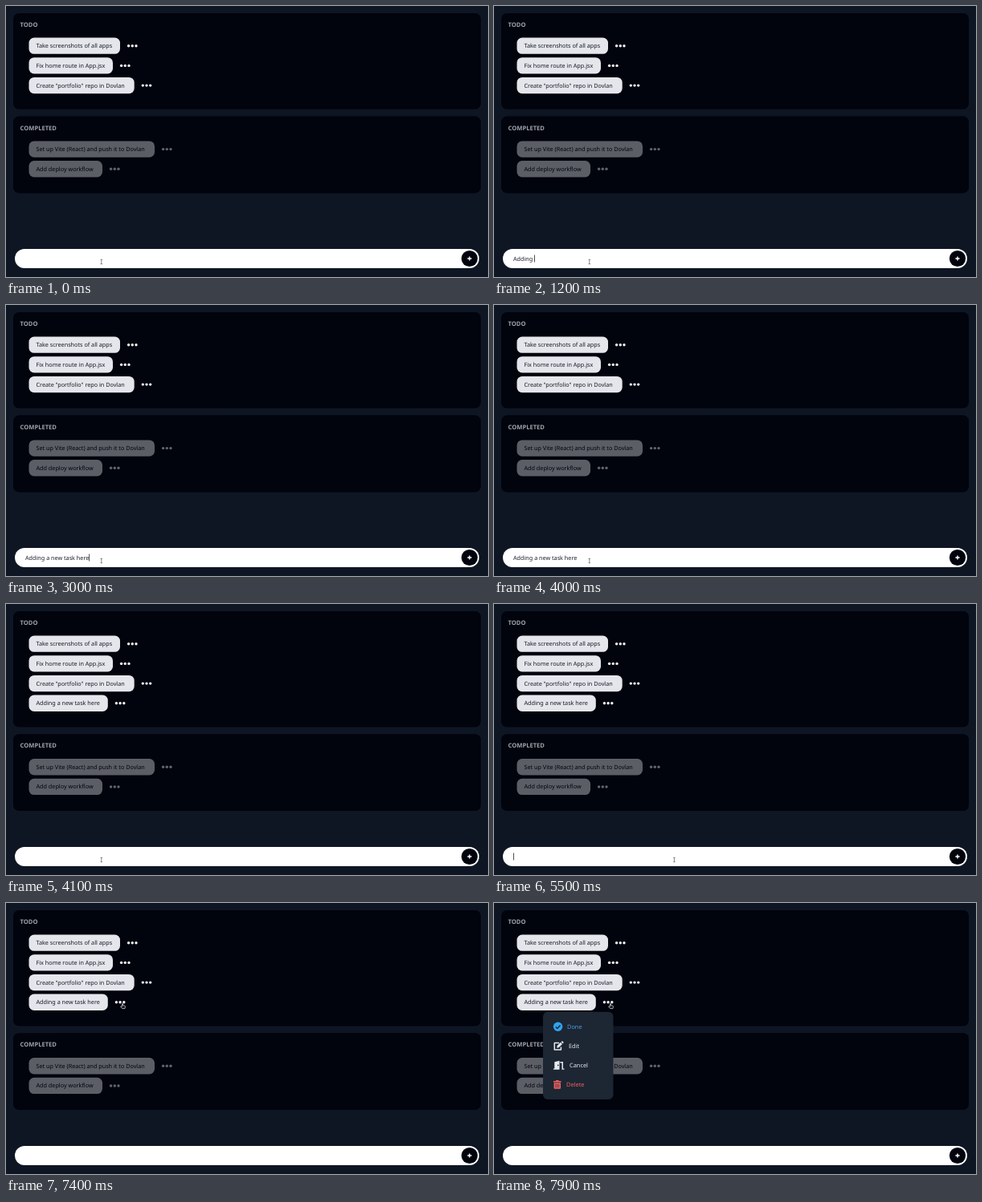
Animation, 600 px wide and 338 px high, one loop 8 s. Source, as an HTML page:

```html
<!DOCTYPE html>
<html lang="en">
<head>
<meta charset="utf-8">
<title>Todo list</title>
<style>
  html, body { margin: 0; width: 100%; height: 100%; overflow: hidden; background: #0f1623; }
  svg { display: block; width: 600px; height: 338px; }
  text { font: 7.23px "Noto Sans", "Open Sans", sans-serif; white-space: pre; text-rendering: geometricPrecision; }
  .panel { fill: #01030d; }
  .title { font-size: 7.6px; font-weight: 700; fill: #a0a4ac; }
  .pill { fill: #e5e6eb; }
  .label { fill: #161a25; }
  .dots { fill: #f4f5f7; }
  .done { opacity: .4; }
  .done .label { fill: #01030d; }
  #menu { transform-origin: 105px 136px; }
  #menu text { font-size: 7.4px; }
  .light { fill: #e6e9ee; }
  .cursor { stroke-linejoin: round; }
</style>
</head>
<body>
<svg viewBox="0 0 600 338">
  <rect id="todoPanel" class="panel" x="9" y="9" width="582" rx="7"/>
  <text class="title" x="17.5" y="25.5">TODO</text>
  <g id="todo"></g>

  <g id="completed">
    <rect class="panel" x="9" y="137.6" width="582" height="95.8" rx="7"/>
    <text class="title" x="17.5" y="154.6">COMPLETED</text>
    <g id="doneList" class="done"></g>
  </g>

  <g id="menu">
    <rect x="61" y="135.8" width="87.5" height="109.2" rx="6" fill="#1d2633"/>
    <circle cx="79.6" cy="154.3" r="5.7" fill="#2fa4f0"/>
    <path d="M76.8 154.5l2 2 3.7-4" fill="none" stroke="#1d2633" stroke-width="1.5"/>
    <text x="91" y="157" fill="#4b9de2">Done</text>

    <g class="light">
      <path d="M81 174.6h-5.7v8.3h8.1v-3.4" fill="none" stroke="#e6e9ee" stroke-width="1.5" stroke-linejoin="round"/>
      <path d="M78.2 180.7l.4-2.6 4.3-4.3 2.1 2.1-4.3 4.3zM83.5 173.2l.9-.8q.6-.4 1.1.1l.9.9q.5.6 0 1.1l-.8.8z"/>
      <text x="93" y="181">Edit</text>
      <path d="M75.3 198.2l6.2-1.5v11.1h-7.6v-1.4h1.4zM82.3 198h3.7v8.4h1.5v1.4h-3v-8.3h-2.2z"/>
      <circle cx="79.8" cy="202.4" r=".8" fill="#1d2633"/>
      <text x="94" y="205">Cancel</text>
    </g>

    <g fill="#f0615f">
      <path d="M74 222h2.8l.6-1h2.8l.6 1h2.8v1.4H74zM74.6 224.2h8.4v6.6q0 1-1 1h-6.4q-1 0-1-1z"/>
      <path d="M76.8 225.6v4.8M78.8 225.6v4.8M80.8 225.6v4.8" stroke="#1d2633" stroke-width=".7"/>
      <text x="90" y="229.2">Delete</text>
    </g>
  </g>

  <rect x="11" y="303" width="578" height="24" rx="12" fill="#fff"/>
  <circle cx="577" cy="315" r="10.1" fill="#02040d"/>
  <path d="M574.4 315h5.2M577 312.4v5.2" stroke="#fff" stroke-width="1.4"/>
  <text id="input" x="24" y="317.5" fill="#1b1e27"></text>
  <rect id="caret" y="310.5" width=".8" height="9" fill="#222"/>

  <path id="beam" class="cursor" d="M-1.2-2.7h2.4M0-2.7v5.4M-1.2 2.7h2.4" fill="none" stroke="#555" stroke-width=".7"/>
  <path id="arrow" class="cursor" d="M0 0v5l1.2-1 .9 1.9 .9-.4-.9-1.8h1.6z" fill="#11141c" stroke="#d5d7dc" stroke-width=".6"/>
  <path id="hand" class="cursor" d="M-.6.4q.6-.8 1.1 0v2l2.5.6q.7.3.5 1.2l-.5 2.1h-3.4l-2-2.5q.2-.9 1.8.1z" fill="#11141c" stroke="#e4e6ea" stroke-width=".7"/>
</svg>

<script>
const LOOP = 8000, STEP = 100, ROW = 24.7;
const TASK = 'Adding a new task here';
const $ = id => document.getElementById(id);

// [time, characters typed]
const KEYS = [[0, 0], [200, 1], [400, 2], [500, 3], [900, 4], [1000, 5], [1100, 6],
  [1200, 7], [1300, 8], [1400, 10], [1600, 12], [1800, 13], [1900, 14], [2100, 15],
  [2200, 16], [2300, 17], [2500, 18], [2700, 20], [2900, 21], [3000, 22], [4100, 0]];
const CARET_ON = [[200, 3600], [4200, 4800], [5400, 6000], [6600, 7200]];
// [time, x, y] of the pointer
const PATH = [[5300, 118.8, 319], [5700, 330, 319], [6100, 577, 314], [6200, 577, 314],
  [6500, 544.8, 294.5], [6800, 330, 208], [7100, 150, 133], [7200, 145, 125.3]];

function addTask(list, label, right, y) {
  const dots = [10.6, 15.3, 20].map(d => `<circle cx="${right + d}" cy="${y + 10.2}" r="1.7"/>`).join('');
  list.insertAdjacentHTML('beforeend', `<g>
    <rect class="pill" x="28.5" y="${y}" width="${right - 28.5}" height="20.3" rx="6.5"/>
    <text class="label" x="37.5" y="${y + 12.6}">${label}</text>
    <g class="dots">${dots}</g></g>`);
}

[['Take screenshots of all apps', 142], ['Fix home route in App.jsx', 133],
 ['Create "portfolio" repo in Dovlan', 159.7], [TASK, 126.8]]
  .forEach(([label, right], i) => addTask($('todo'), label, right, 39.5 + i * ROW));
[['Set up Vite (React) and push it to Dovlan', 185], ['Add deploy workflow', 120]]
  .forEach(([label, right], i) => addTask($('doneList'), label, right, 168.4 + i * ROW));

const newTask = $('todo').lastElementChild;
const show = (el, on) => el.setAttribute('visibility', on ? 'visible' : 'hidden');

function pointerAt(t) {
  const i = PATH.findIndex(p => p[0] > t);
  if (i === 0) return PATH[0].slice(1);
  if (i < 0) return PATH[PATH.length - 1].slice(1);
  const [t0, x0, y0] = PATH[i - 1], [t1, x1, y1] = PATH[i];
  const k = (t - t0) / (t1 - t0);
  return [x0 + (x1 - x0) * k, y0 + (y1 - y0) * k];
}

function render(t) {
  const typed = KEYS.filter(k => k[0] <= t).pop()[1];
  $('input').textContent = TASK.slice(0, typed);
  $('caret').setAttribute('x', 24 + (typed ? $('input').getComputedTextLength() : 0));
  show($('caret'), CARET_ON.some(([a, b]) => t >= a && t < b));

  const added = t >= 4100;
  show(newTask, added);
  $('todoPanel').setAttribute('height', 119.8 + (added ? ROW : 0));
  $('completed').setAttribute('transform', `translate(0 ${added ? ROW : 0})`);

  const open = Math.min(1, Math.max(0, (t - 7400) / 300));
  const eased = 1 - (1 - open) ** 2;
  $('menu').style.opacity = eased;
  $('menu').style.transform = `scale(${.95 + .05 * eased})`;

  const [x, y] = pointerAt(t);
  const onButton = Math.hypot(x - 577, y - 315) < 10;
  const kind = onButton || t >= 7200 ? 'hand' : y > 303 ? 'beam' : 'arrow';
  for (const id of ['beam', 'arrow', 'hand']) show($(id), id === kind);
  $(kind).setAttribute('transform', `translate(${x} ${y})`);
}

function tick() {
  const t = performance.now() % LOOP;
  render(Math.floor(t / STEP) * STEP);
  requestAnimationFrame(tick);
}
tick();
</script>
</body>
</html>
```
